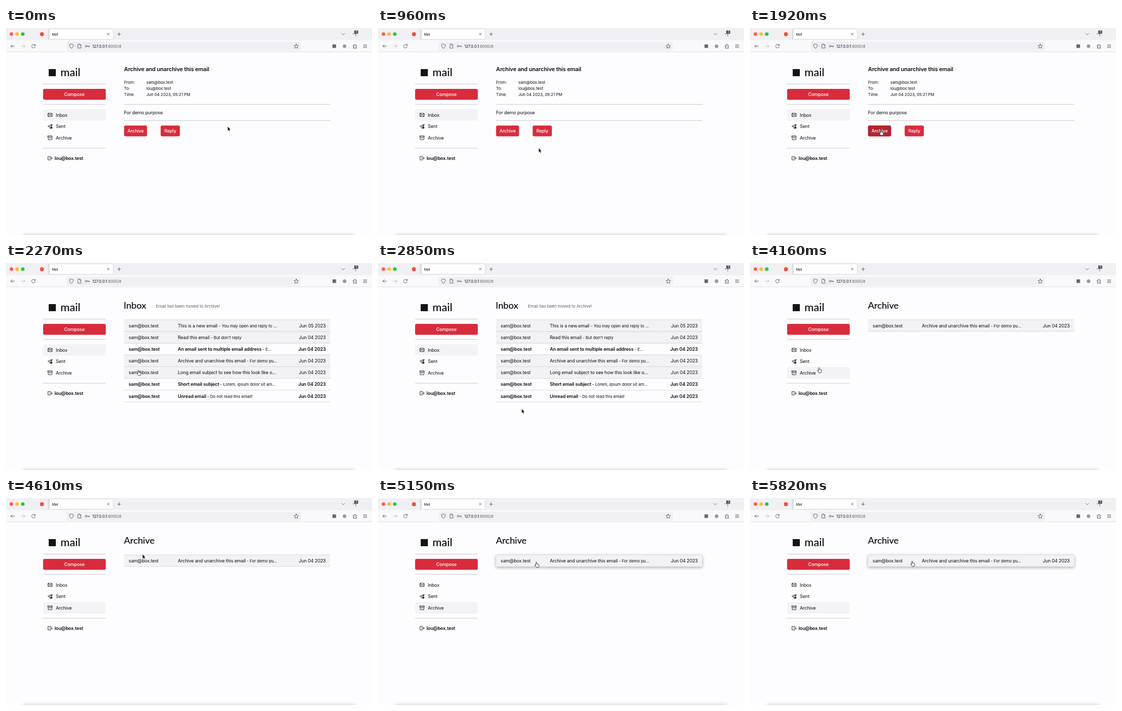
An HTML page that plays this animation: 720x408 px, repeating every 5.85 s.

```html
<!DOCTYPE html>
<html lang="en">
<head>
<meta charset="utf-8">
<title>Mail</title>
<style>
html, body { margin: 0; width: 100%; height: 100%; overflow: hidden; background: #fdfcfe; }
svg { display: block; width: 720px; height: 408px; }
text { font: 9px Inter, sans-serif; letter-spacing: -.015em; fill: #0c0c0e; }
.bold { font-weight: 600; }
.small { font-size: 7.9px; font-weight: 400; letter-spacing: 0; }
.label { font-weight: 500; fill: #fff; text-anchor: middle; }
.title { font: 18.2px Lato, sans-serif; letter-spacing: 0; stroke: #0c0c0e; stroke-width: .2; }
.line { stroke: #c9c8cb; fill: none; }
.icon { fill: none; stroke: #1c1c20; stroke-width: .9; stroke-linecap: round; stroke-linejoin: round; }
.chrome { stroke: #55555e; }
.red { fill: #d82c3d; }
.soft { fill: #f3f2f4; }
</style>
</head>
<body>
<svg viewBox="0 0 720 408">
  <defs>
    <filter id="blur" x="-10%" y="-300%" width="120%" height="700%"><feGaussianBlur stdDeviation="3"/></filter>
  </defs>
  <rect width="720" height="408" fill="#fdfcfe"/>
  <rect x="34" y="407" width="652" height="8" fill="#999" opacity=".45" filter="url(#blur)"/>

  <!-- browser -->
  <rect width="720" height="24" fill="#f0f0f4"/>
  <rect y="24" width="720" height="23" fill="#f9f9fb"/>
  <path class="line" d="M0 47H720" style="stroke:#e0dfe3"/>
  <circle cx="10.7" cy="12" r="3.6" fill="#fe5f57"/>
  <circle cx="21.8" cy="12" r="3.6" fill="#febc2e"/>
  <circle cx="33" cy="12" r="3.6" fill="#28c840"/>
  <circle cx="70.7" cy="12.2" r="4" fill="#f2503c"/>
  <path class="line" d="M83.5 2V23"/>
  <rect x="85.5" y="1.8" width="125.5" height="20.4" rx="2.2" fill="#fff" stroke="#cfcfd6" stroke-width=".8"/>
  <text x="90.5" y="14.7" style="font-size:6.2px">Mail</text>
  <rect x="119.5" y="27" width="460.5" height="18" rx="2.2" fill="#f0f0f4"/>
  <text class="small" x="170" y="38.8" style="font-size:7.5px">127.0.0.1<tspan fill="#5b5b63">:8000/#</tspan></text>
  <g class="icon chrome">
    <path d="M199.3 10l4 4m0-4l-4 4M222.5 9v6.4m-3.2-3.2h6.4M660.7 10.7l2.8 2.8 2.8-2.8"/>
    <path d="M17 35.8H9.5m3.3-3.3l-3.3 3.3 3.3 3.3"/>
    <path d="M30 35.8h7.5m-3.3-3.3l3.3 3.3-3.3 3.3" stroke="#bbbbc2"/>
    <path d="M57.2 34A3.6 3.6 0 1 0 57.5 37M57.6 31.8v2.5h-2.5"/>
    <path d="M128.7 31.5l3.7 1.3q.2 5.2-3.7 7.4-3.9-2.2-3.7-7.4z"/>
    <path d="M142 31.7h3.4l2 2v6H142zM145.2 31.9v2h2"/>
    <path d="M159.5 35.8h4.6v1.6m-1.6-1.6v1.2"/><circle cx="157.6" cy="35.8" r="1.8"/>
    <path d="M571 31.5l1.3 2.8 3 .4-2.2 2.1.6 3.1-2.7-1.5-2.7 1.5.6-3.1-2.2-2.1 3-.4z"/>
    <path d="M683.3 34h2.2q-.7-2 .9-2 1.6 0 .9 2h2.2v2q-1.6-.5-1.6 1 0 1.5 1.6 1v2h-6.2v-2q1.6.5 1.6-1 0-1.5-1.6-1z"/>
    <path d="M703 33.2h6.8m-6.8 2.6h6.8m-6.8 2.6h6.8"/>
    <path d="M682.5 11.5h2.5m3 .5v4.2"/>
  </g>
  <rect x="642.3" y="32.3" width="7" height="7" fill="#66666e"/>
  <circle cx="666" cy="35.8" r="3.6" fill="#9a9aa2"/>
  <rect x="685" y="4.8" width="7.8" height="6.6" rx="1" fill="#55555a"/>
  <text class="label" x="688.9" y="10.2" style="font-size:5.6px">1</text>

  <!-- sidebar -->
  <rect x="84" y="81" width="14" height="14" fill="#141416"/>
  <text class="title" x="107.3" y="94.6" style="font-size:21.8px">mail</text>
  <path class="line" d="M73 110.5H196M73 150.5H196M73 237H196"/>
  <rect class="red" x="73" y="120" width="123.3" height="21.5" rx="3"/>
  <text class="label" x="134.6" y="134">Compose</text>
  <rect id="navInbox" class="soft" x="73" y="160.2" width="123.3" height="22.4" rx="3"/>
  <rect id="navArchive" class="soft" x="73" y="205.3" width="123.3" height="22.4" rx="3"/>
  <g class="icon">
    <rect x="82.5" y="168" width="8.4" height="6.6" rx="1"/>
    <path d="M82.7 169l4 2.7 4-2.7M82.8 174l3-2.8m4.8 2.8l-3-2.8"/>
    <path d="M90.6 190.2l-8.2 3.3 2.8 1.6 1.6 2.7zM90.6 190.2l-5.4 4.9M90.6 190.2l-1.1 4"/>
    <circle cx="89.3" cy="196.5" r="1.5" fill="#1c1c20"/>
    <path d="M82.4 212.6h8.6v2.2h-8.6zM83.1 214.8v5.4h7.2v-5.4M85.5 216.8h2.4"/>
    <path d="M88 254.6v-1.4h-5.4v6.8H88v-1.5M85.5 256.6h5.4m-1.7-1.7l1.7 1.7-1.7 1.7"/>
  </g>
  <text x="98" y="174.5">Inbox</text>
  <text x="98" y="197.2">Sent</text>
  <text x="98" y="219.7">Archive</text>
  <text class="bold" x="95.6" y="259.8">lou@box.test</text>

  <!-- pages -->
  <g id="message">
    <text class="bold" x="232.3" y="85.4" style="font-size:11px">Archive and unarchive this email</text>
    <text class="small" x="232.3" y="110.4">From:<tspan x="276">sam@box.test</tspan></text>
    <text class="small" x="232.3" y="122.3">To:<tspan x="276">lou@box.test</tspan></text>
    <text class="small" x="232.3" y="134.2">Time:<tspan x="276">Jun 04 2023, 05:21 PM</tspan></text>
    <path class="line" d="M232.3 150.5H638M232.3 182.5H638"/>
    <text x="232.3" y="170.2">For demo purpose</text>
    <rect class="red" x="232.3" y="192.2" width="45.2" height="21.4" rx="3"/>
    <rect id="pressed" x="232.3" y="192.2" width="45.2" height="21.4" rx="3" fill="#b02432"/>
    <rect class="red" x="304.3" y="192.2" width="37.7" height="21.4" rx="3"/>
    <text class="label" x="254.9" y="206.2">Archive</text>
    <text class="label" x="323.1" y="206.2">Reply</text>
  </g>
  <g id="inbox">
    <text class="title" x="231.5" y="89.6">Inbox</text>
    <text class="small" x="295" y="88" style="fill:#5c5c62">Email has been moved to Archive!</text>
  </g>
  <g id="archive">
    <text class="title" x="232" y="89.6">Archive</text>
    <rect id="shadow" x="232.3" y="114" width="405.4" height="23" fill="#000" filter="url(#blur)"/>
  </g>

  <g id="status">
    <path d="M0 400H51q2 0 2 2v6H0z" fill="#f3f3f6" stroke="#d0d0d6" stroke-width=".6"/>
    <text class="small" x="2" y="406.6" style="font-size:6.2px">127.0.0.1:8000/#</text>
  </g>
  <g id="cursor">
    <path id="arrow" d="M0 0V8.8L2 7l1.4 3.1 1.4-.6L3.5 6.5H6.2z" stroke="#fff" stroke-width=".6"/>
    <path id="hand" d="M-1 1a.9.9 0 0 1 1.8 0V3.5l3.4.8q1 .4.9 1.6l-.4 2.2-.8 2.2H.3L-3 6.5q-.4-1 .6-1.1l1.4 1z" fill="#fff" stroke="#111" stroke-width=".8"/>
  </g>
</svg>
<script>
const LOOP = 5850, ROW = 23.1, TOP = 112;
const $ = id => document.getElementById(id);

// subject, preview, day in June, unread
const mails = [
  ['This is a new email', 'You may open and reply to ...', '05'],
  ['Read this email', "But don't reply", '04'],
  ['An email sent to multiple email address', 'E...', '04', true],
  ['Archive and unarchive this email', 'For demo pu...', '04'],
  ['Long email subject to see how this look like o...', '', '04'],
  ['Short email subject', 'Lorem, ipsum dolor sit am...', '04', true],
  ['Unread email', 'Do not read this email!', '04', true],
];

function row([subject, preview, day, unread], i) {
  const y = TOP + i * ROW, base = y + 14.9;
  const weight = unread ? 'bold' : '';
  const tail = preview && ` <tspan class="small">- ${preview}</tspan>`;
  return `
    <rect x="232.3" y="${y}" width="405.4" height="${ROW}" fill="${unread ? '#fdfcfe' : '#f2f1f3'}"/>
    <path class="line" style="stroke:#dbdadd" d="M232.3 ${y}h405.4m0 ${ROW}h-405.4"/>
    <text class="${weight}" x="241.3" y="${base}">sam@box.test</text>
    <text class="${weight}" x="338" y="${base}">${subject}${tail}</text>
    <text class="${weight}" x="629" y="${base}" text-anchor="end">Jun ${day} 2023</text>`;
}
$('inbox').insertAdjacentHTML('beforeend', mails.map(row).join(''));
$('archive').insertAdjacentHTML('beforeend', row(mails[3], 0));

// pointer path: time, x, y
const path = [
  [0, 436, 193.5], [130, 436, 246], [640, 436, 246], [780, 392, 246], [960, 316.3, 236.7],
  [1100, 276, 216], [1250, 257.3, 201.5], [2130, 257.3, 201.5], [2500, 265.5, 228],
  [2680, 274, 262], [2850, 282.5, 287.3], [3110, 282.5, 287.3], [3260, 258, 268],
  [3450, 168, 228], [3650, 125, 214.4], [4060, 125, 214.4], [4200, 140, 203],
  [4400, 205, 150], [4610, 268.3, 110.8], [4660, 276, 113], [4900, 303, 122],
  [5250, 315, 128], [5500, 309.5, 122], [5820, 319, 124.5], [LOOP, 319, 124.5],
];

function pointer(t) {
  const i = path.findIndex(p => p[0] > t), a = path[i - 1], b = path[i];
  const k = (t - a[0]) / (b[0] - a[0]);
  return [a[1] + (b[1] - a[1]) * k, a[2] + (b[2] - a[2]) * k];
}

const ramp = (t, from, to) => Math.min(1, Math.max(0, (t - from) / (to - from)));
const show = (id, alpha) => $(id).setAttribute('opacity', +alpha);

function clickable(x, y, page) {
  const inside = (x0, y0, x1, y1) => x >= x0 && x <= x1 && y >= y0 && y <= y1;
  if (inside(73, 160, 196, 228)) return true;
  if (page === 'message') return inside(232, 192, 277.5, 213.6);
  return inside(232, TOP, 638, TOP + ROW * (page === 'inbox' ? mails.length : 1));
}

function draw(now) {
  const t = now % LOOP;
  const page = t < 2010 ? 'message' : t < 4120 ? 'inbox' : 'archive';
  for (const id of ['message', 'inbox', 'archive']) $(id).style.display = id === page ? '' : 'none';
  show('pressed', ramp(t, 1210, 1370));
  show('navInbox', page !== 'archive');
  show('navArchive', ramp(t, 3520, 3670));
  show('status', t < 4140 ? ramp(t, 3750, 3840) : 0);
  show('shadow', .35 * ramp(t, 4640, 4940));
  const [x, y] = pointer(t), hand = clickable(x, y, page);
  $('cursor').setAttribute('transform', `translate(${x} ${y})`);
  show('hand', hand);
  show('arrow', !hand);
  requestAnimationFrame(() => draw(performance.now()));
}
draw(performance.now());
</script>
</body>
</html>
```
